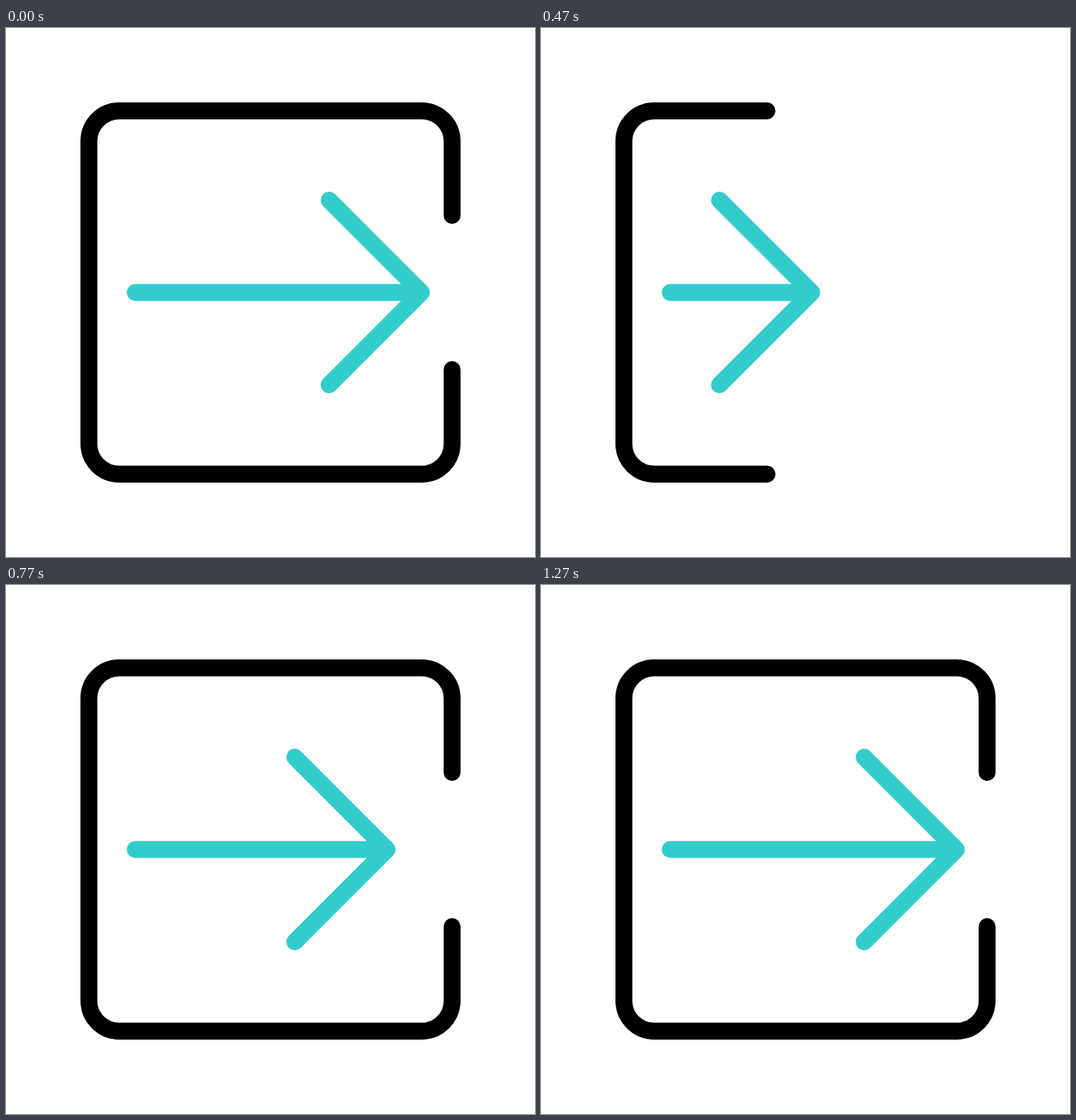
Recreate the animation shown at these times as an HTML page. Size 640x640 px, loop 2000 ms.

```html
<!DOCTYPE html>
<html lang="en">
<head>
<meta charset="utf-8">
<title>Exit arrow</title>
<style>
  html, body { margin: 0; height: 100%; overflow: hidden; background: #fff; }
  svg { display: block; width: 100%; height: 100%; }
  path { fill: none; stroke-width: 20.4; stroke-linecap: round; stroke-linejoin: round; }
</style>
</head>
<body>
<svg viewBox="0 0 640 640">
  <path id="box" stroke="#000" pathLength="100"
    d="M539.7 226.9V136.9A36.6 36.6 0 0 0 503.1 100.3H136.9A36.6 36.6 0 0 0 100.3 136.9V503.1A36.6 36.6 0 0 0 136.9 539.7H503.1A36.6 36.6 0 0 0 539.7 503.1V413.1"/>
  <path id="arrow" stroke="#33cccc"/>
</svg>
<script>
const FPS = 30, LOOP = 2000;
const box = document.getElementById('box');
const arrow = document.getElementById('arrow');

// Keys are [frame, value]
const trimKeys = [[0, 0], [14, 25], [22, 0]];
const slideKeys = [[0, 0], [14, 175], [21, 0], [26, 112], [30, 0], [34, 71], [38, 0]];

// Symmetric cubic-bezier(h, 0, 1 - h, 1), solved by bisection
function ease(x, h) {
  let lo = 0, hi = 1, u = 0.5;
  for (let i = 0; i < 24; i++) {
    const v = 1 - u;
    const bx = 3 * h * u * v * v + 3 * (1 - h) * u * u * v + u ** 3;
    if (bx < x) lo = u; else hi = u;
    u = (lo + hi) / 2;
  }
  return u * u * (3 - 2 * u);
}

function valueAt(keys, frame, h) {
  const next = keys.findIndex(([f]) => f > frame);
  if (next < 0) return keys[keys.length - 1][1];
  const [f0, v0] = keys[next - 1], [f1, v1] = keys[next];
  return v0 + (v1 - v0) * ease((frame - f0) / (f1 - f0), h);
}

function draw(now) {
  const frame = Math.floor((now % LOOP + 3.4) * FPS / 1000) % (LOOP * FPS / 1000);
  const trim = valueAt(trimKeys, frame, 0.2);
  const tip = 502.6 - valueAt(slideKeys, frame, 0.23);

  box.setAttribute('stroke-dasharray', `${100 - 2 * trim} 100`);
  box.setAttribute('stroke-dashoffset', -trim);
  arrow.setAttribute('d', `M156.3 320H${tip}m-111.7 -111.7l111.7 111.7l-111.7 111.7`);
  requestAnimationFrame(draw);
}
draw(performance.now());
</script>
</body>
</html>
```
